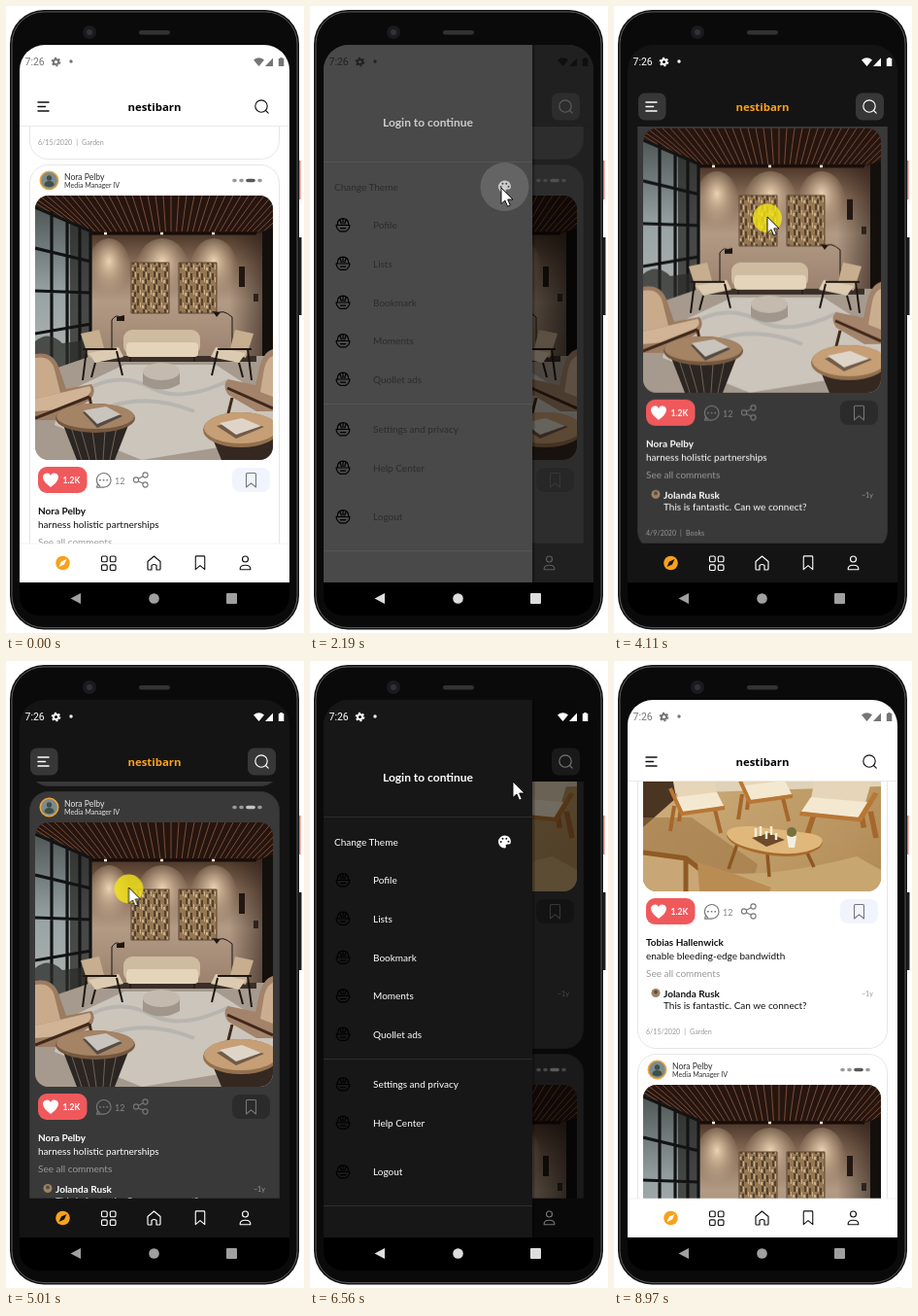
These frames come from a looping animation (307x645 px, 9000 ms). An HTML page:

```html
<!DOCTYPE html>
<html lang="en">
<head>
<meta charset="utf-8">
<title>App theme demo</title>
<style>
@property --bg { syntax: '<color>'; inherits: true; initial-value: #fff; }
@property --panel { syntax: '<color>'; inherits: true; initial-value: #fff; }
@property --card { syntax: '<color>'; inherits: true; initial-value: #fff; }
@property --line { syntax: '<color>'; inherits: true; initial-value: #e6e6e6; }
@property --rule { syntax: '<color>'; inherits: true; initial-value: #e9e9e9; }
@property --fg { syntax: '<color>'; inherits: true; initial-value: #111; }
@property --btn { syntax: '<color>'; inherits: true; initial-value: #fff; }
@property --save { syntax: '<color>'; inherits: true; initial-value: #f1f4fc; }
@property --brand { syntax: '<color>'; inherits: true; initial-value: #000; }
@property --item { syntax: '<color>'; inherits: true; initial-value: #1c1c1c; }
@property --sys { syntax: '<color>'; inherits: true; initial-value: rgba(0,0,0,.54); }
@property --nav { syntax: '<color>'; inherits: true; initial-value: #999; }

html, body { margin: 0; width: 100%; height: 100%; overflow: hidden; background: #fff; }
svg { display: block; width: 100vw; height: 100vh; }
text { font-family: Lato, sans-serif; font-size: 10px; fill: var(--fg); }
.b { font-weight: 700; }
.s { font-size: 7.1px; }
.mute { fill: #999; }
.ico { fill: none; stroke: var(--fg); stroke-width: 1.15; stroke-linecap: round; stroke-linejoin: round; }
.soft { fill: none; stroke: #777; stroke-width: 1.1; stroke-linejoin: round; }

#app { animation: theme 9s linear infinite, items 9s linear infinite, sys 9s step-end infinite, nav 9s step-end infinite; }
#feed { animation: scroll 9s linear infinite; }
#drawer { animation: drawer 9s ease-out infinite; }
#scrim { animation: scrim 9s ease-out infinite; }
#ripple { transform-box: fill-box; transform-origin: center; animation: ripple 9s ease-out infinite; }
#cursor { animation: move 9s ease-in-out infinite; }
#press { animation: press 9s step-end infinite; }

@keyframes theme {
  0%, 22.6%, 83.13%, 100% { --bg: #fff; --panel: #fff; --card: #fff; --line: #e6e6e6; --rule: #e9e9e9; --fg: #111; --btn: #fff; --save: #f1f4fc; --brand: #000; }
  24.82%, 80.91% { --bg: #141414; --panel: #171717; --card: #393939; --line: #303030; --rule: #141414; --fg: #fff; --btn: #373737; --save: #2b2b2b; --brand: #f9a11b; }
}
@keyframes items {
  0%, 24.2%, 84.3%, 100% { --item: #1c1c1c; }
  26.2%, 82.1% { --item: #fff; }
}
@keyframes sys {
  0%, 83.5%, 100% { --sys: rgba(0,0,0,.54); }
  24.9% { --sys: #fff; }
}
@keyframes nav {
  0%, 40%, 90.44%, 100% { --nav: #a0a0a0; }
  11.56%, 68.89% { --nav: #ddd; }
}
@keyframes scroll {
  0%, 43.78% { transform: none; }
  45.67% { transform: translateY(-69px); animation-timing-function: ease-out; }
  47.78% { transform: translateY(-104px); animation-timing-function: ease-out; }
  52.22% { transform: translateY(-112px); }
  53.78% { transform: translateY(-112px); animation-timing-function: ease-in; }
  56.89% { transform: translateY(76px); animation-timing-function: cubic-bezier(.2,.55,.5,.95); }
  60% { transform: translateY(230px); animation-timing-function: ease-out; }
  63.78%, 100% { transform: translateY(241px); }
}
@keyframes drawer {
  0%, 11.56%, 40%, 68.89%, 90.44%, 100% { transform: translateX(-232px); }
  14.33%, 37.33%, 71.56%, 87.67% { transform: none; }
}
@keyframes scrim {
  0%, 11.56%, 40%, 68.89%, 90.44%, 100% { opacity: 0; }
  14.33%, 37.33%, 71.56%, 87.67% { opacity: .54; }
}
@keyframes ripple {
  0%, 22.5% { opacity: 0; transform: scale(.3); }
  24.2%, 27% { opacity: .15; transform: none; }
  30.4% { opacity: 0; transform: none; }
  80.8% { opacity: 0; transform: scale(.3); }
  82.5% { opacity: .05; transform: none; }
  84.7%, 100% { opacity: 0; transform: none; }
}
@keyframes move {
  0%, 1.1% { transform: translate(268px, 665px); }
  1.11% { transform: translate(268px, 613px); }
  10.4%, 14% { transform: translate(34px, 102px); }
  20.5%, 33.5% { transform: translate(197px, 187px); }
  36.5%, 38% { transform: translate(262px, 300px); }
  43%, 43.78% { transform: translate(158px, 286px); animation-timing-function: linear; }
  45.67% { transform: translate(158px, 217px); animation-timing-function: ease-out; }
  47.78%, 48.5% { transform: translate(158px, 182px); }
  52.5%, 53.78% { transform: translate(130px, 150px); animation-timing-function: ease-in; }
  56.89%, 64.6% { transform: translate(122px, 338px); }
  68%, 69.5% { transform: translate(34px, 102px); }
  72.89% { transform: translate(209px, 124px); }
  75% { transform: translate(209px, 127px); }
  79.5%, 84.9% { transform: translate(209px, 190px); }
  86.7%, 88.5% { transform: translate(262px, 320px); }
  94.9% { transform: translate(272px, 625px); }
  95.22% { transform: translate(272px, 638px); }
  95.5%, 100% { transform: translate(293px, 658px); }
}
@keyframes press {
  0%, 12.2%, 23.6%, 38%, 47.78%, 56.89%, 69.6%, 81.8%, 88.6% { opacity: 0; }
  10.9%, 22%, 37%, 43.78%, 53.78%, 68.4%, 80.3%, 87.4%, 99.6%, 100% { opacity: .8; }
}
</style>
</head>
<body>
<svg viewBox="0 0 307 645" preserveAspectRatio="none">
<defs>
  <clipPath id="screen"><path d="M14 593V66a26 26 0 0 1 26-26H266a26 26 0 0 1 26 26V593Z"/></clipPath>
  <clipPath id="list"><rect x="14" y="124" width="278" height="429"/></clipPath>
  <clipPath id="pic"><rect width="245" height="272" rx="14"/></clipPath>
  <linearGradient id="wall" x2="0" y2="1"><stop offset=".14" stop-color="#4b3527"/><stop offset=".26" stop-color="#8a6f5a"/><stop offset=".4" stop-color="#b29a84"/><stop offset=".6" stop-color="#9c8471"/></linearGradient>
  <radialGradient id="glow" cy=".35"><stop stop-color="#ecd3b2"/><stop offset="1" stop-color="#c3a78b" stop-opacity="0"/></radialGradient>
  <linearGradient id="shade"><stop stop-color="#2a1d16" stop-opacity="0"/><stop offset="1" stop-color="#2a1d16" stop-opacity=".75"/></linearGradient>
  <linearGradient id="pane" x2="0" y2="1"><stop stop-color="#4d5554"/><stop offset=".5" stop-color="#98a3a4"/><stop offset="1" stop-color="#b4b8b4"/></linearGradient>
  <linearGradient id="floor" x2="1" y2="1"><stop stop-color="#dcbf8d"/><stop offset="1" stop-color="#b08a55"/></linearGradient>
  <pattern id="mosaic" width="11" height="13" patternUnits="userSpaceOnUse">
    <rect width="11" height="13" fill="#957753"/><path d="M1 0h2v6h-2zM6 2h2v7h-2zM3 8h2v5h-2z" fill="#54412f"/><path d="M4 1h1v5h-1zM9 6h1v5h-1zM0 9h2v3h-2z" fill="#cbb287"/>
  </pattern>

  <g id="seat">
    <path d="M4 36 0 62M46 40 52 64M12 30 9 52" stroke="#a5672c" stroke-width="4" fill="none"/>
    <path d="M2 0 44-4 48 24 8 28Z" fill="#e6d5b8"/>
    <path d="M6 27 48 22 55 36 11 43Z" fill="#f4e8d0"/>
    <path d="M0 18 12 44 56 38" stroke="#b87734" stroke-width="4" fill="none"/>
  </g>

  <g id="lobby" clip-path="url(#pic)">
    <rect width="245" height="272" fill="url(#wall)"/>
    <ellipse cx="76" cy="78" rx="23" ry="34" fill="url(#glow)"/>
    <ellipse cx="131" cy="78" rx="28" ry="34" fill="url(#glow)"/>
    <ellipse cx="184" cy="78" rx="25" ry="34" fill="url(#glow)"/>
    <rect x="200" y="38" width="45" height="128" fill="url(#shade)"/>
    <path d="M0 0H245V34L228 39H58L0 18Z" fill="#26150f"/>
    <g id="slats" stroke="#7a4d39"></g>
    <path d="M58 39H228" stroke="#160d0a" stroke-width="3"/>
    <path d="M71 39h3M129 39h3M182 39h3" stroke="#fff3d8" stroke-width="2.5"/>
    <path d="M0 10 58 36V172L0 192Z" fill="url(#pane)"/>
    <path d="M36 27 58 36V172L36 178Z" fill="#23211e" opacity=".7"/>
    <path d="M0 12 58 37M0 54 58 68M0 98 58 100M0 142 58 132M17 16V185M33 26V180M46 30V175M57 36V170" stroke="#131313" stroke-width="3.2" fill="none"/>
    <path d="M0 150Q14 138 28 152L58 148V172L0 192Z" fill="#2a2b28" opacity=".75"/>
    <path d="M234 37 245 33V165H234Z" fill="#130f0c"/>
    <path d="M210 73h6v21h-6z" fill="#211811"/>
    <path d="M225 101h5v8h-5z" fill="#2b241e"/>
    <path d="M99 69h39v52H99zM148 69h39v52h-39z" fill="url(#mosaic)" stroke="#5f4835"/>
    <path d="M0 185 58 165H245V272H0Z" fill="#a59a8d"/>
    <path d="M62 165H228V171H62Z" fill="#3a2f28"/>
    <path d="M28 204 92 174H186L245 212V250L110 272 20 236Z" fill="#cbc5bc"/>
    <path d="M60 196q30-14 60 2t80-8M80 216q40-12 84 6" stroke="#a3a5a3" stroke-width="4" fill="none" opacity=".5"/>
    <path d="M79 165V128q5-7 9-2M203 165V125q-10-9-16-3" stroke="#1d1611" fill="none"/>
    <path d="m84 125 8-2v6h-8zM183 119l8 1-4 5z" fill="#1d1611"/>
    <rect x="91" y="138" width="79" height="26" rx="9" fill="#cfbb9f"/>
    <rect x="94" y="151" width="74" height="15" rx="4" fill="#e3d4ba"/>
    <path d="M98 166v5M164 166v5" stroke="#2b1f17" stroke-width="2"/>
    <g id="arm">
      <path d="M47 142 66 138 72 161 55 167Z" fill="#c6ae8f"/><path d="M55 162 86 156 91 166 62 172Z" fill="#dccbb0"/>
      <path d="M49 158H84M53 158 49 190M84 160 90 185M62 172 58 187" stroke="#1f1712" stroke-width="2" fill="none"/>
    </g>
    <use href="#arm" transform="matrix(-1 0 0 1 272 0)"/>
    <path d="M111 182v12q19 11 38 0v-12z" fill="#a0968b"/><ellipse cx="130" cy="181" rx="19" ry="9" fill="#c4baad"/>
    <path d="M0 163Q18 160 24 176L32 199 58 194Q64 200 57 210L24 231H0Z" fill="#9c7b60"/>
    <path d="M0 167Q16 164 20 179L26 203 0 209Z" fill="#c9ab8c"/>
    <path d="M26 203 56 196Q60 200 54 206L24 220 0 222V209Z" fill="#d0b495"/>
    <path d="M0 229 56 207M30 226 43 245M56 207 59 222" stroke="#3f281b" stroke-width="3" fill="none"/>
    <path d="M245 158Q235 161 231 177L227 195 199 189Q192 195 199 205L228 222H245Z" fill="#a3836a"/>
    <path d="M245 165Q237 168 235 184L232 202 245 207Z" fill="#cbae90"/>
    <path d="M198 198 245 219M203 208 198 228" stroke="#3f281b" stroke-width="3" fill="none"/>
    <path d="M27 231 43 272H82L98 231Z" fill="#2c2622"/><path d="M36 235 48 272M47 240 56 272M59 242 63 272M72 242 70 272M84 238 77 272" stroke="#6d6259" fill="none"/>
    <ellipse cx="62" cy="229" rx="41" ry="15" fill="#75583f"/><ellipse cx="62" cy="227" rx="40" ry="13" fill="#a58365"/>
    <path d="m49 223 24-5 17 9-26 12z" fill="#544b44"/><path d="m50 221 23-4 15 8-24 10z" fill="#c9c4bd"/>
    <path d="M182 248 192 272H245V248Z" fill="#352820"/>
    <ellipse cx="212" cy="241" rx="39" ry="18" fill="#94704e"/><ellipse cx="212" cy="239" rx="38" ry="16" fill="#c69f76"/>
    <path d="m187 237 26-7 23 8-29 12z" fill="#715b49"/><path d="m190 234 23-5 20 8-26 9z" fill="#ded5c8"/>
  </g>

  <g id="lounge" clip-path="url(#pic)">
    <rect width="245" height="272" fill="url(#floor)"/>
    <path d="M0 0H245V164L0 172Z" fill="#e0d2b8"/>
    <path d="M0 120H24L34 176 0 206Z" fill="#4a3422"/>
    <path d="M0 196 50 196 118 244 110 272H0Z" fill="#9b7442" opacity=".55"/>
    <path d="M60 250Q120 262 220 236L245 250V272H60Z" fill="#c8a670"/>
    <use href="#seat" x="28" y="148"/>
    <use href="#seat" x="98" y="136"/>
    <use href="#seat" transform="matrix(-1.4 0 0 1.05 240 152)"/>
    <path d="M97 223 88 249M166 226 176 247M128 234 130 257" stroke="#8d5722" stroke-width="3.5"/>
    <path d="M86 215Q86 206 112 207L170 214Q192 218 181 228 160 241 120 233 90 226 86 215Z" fill="#a76b2c"/>
    <path d="M86 213Q86 204 112 205L170 212Q192 216 181 226 160 238 120 230 90 224 86 213Z" fill="#e0b87c"/>
    <path d="m112 217 18-5 16 7-19 7z" fill="#6d4a2b"/>
    <path d="M116 216v-9M121 215v-10M127 218v-8M132 214v-9M137 219v-7" stroke="#f5eddb" stroke-width="2.4"/>
    <path d="M148 215h10l-2 12h-6z" fill="#f3eee2"/><circle cx="153" cy="211" r="5" fill="#77703f"/>
    <path d="M0 234 44 240 76 264 74 272H0Z" fill="#c9a675"/><path d="M0 232 44 238 78 264M44 240V272" stroke="#8f5a25" stroke-width="5" fill="none"/>
    <path d="M56 242 94 254 132 268 130 272H58Z" fill="#b98c54"/>
  </g>

  <path id="mark" d="M-5-6.5q0-1 1-1h8q1 0 1 1V7L0 2.8-5 7Z"/>
  <g id="bowl" fill="none" stroke="#000" stroke-width="1.2" stroke-linejoin="round">
    <path d="M-7 0H7Q6.5 4.5 3 6.3H-3Q-6.5 4.5-7 0ZM-5.8-.5Q-5.5-6.8 0-6.8T5.8-.5M-3-5.5-1.6-1M0-6.6V-1M3-5.5 1.6-1M-3 3.2H3"/>
  </g>
  <g id="actions">
    <rect x="33" y="311" width="50.5" height="27" rx="9" fill="#f0595c"/>
    <path d="M46 332q-8-5.600-8-10.400a4.200 4.200 0 0 1 8-1.600 4.200 4.200 0 0 1 8 1.600q0 4.800-8 10.400z" fill="#fff"/>
    <text x="58.5" y="328" class="b" style="font-size:8.5px;fill:#fff">1.2K</text>
    <path class="soft" d="M97 331.100a7.300 7.300 0 1 1 3.600 1H93.500l1-3.200"/>
    <path d="M96 324.700h1.700M99.700 324.700h1.700M103.400 324.700h1.700" stroke="#777" stroke-width="1.6"/>
    <text x="112" y="328.500" style="font-size:9px;fill:#858585">12</text>
    <g class="soft"><circle cx="134" cy="324.500" r="2.600"/><circle cx="143.500" cy="319.500" r="2.600"/><circle cx="143.500" cy="329.500" r="2.600"/><path d="m136.300 323.300 4.900-2.600m-4.900 5 4.900 2.600"/></g>
    <rect x="233" y="312" width="39" height="25" rx="8" fill="var(--save)"/>
    <use href="#mark" x="252.5" y="325" class="soft"/>
  </g>
</defs>

<!-- phone body -->
<path d="M301 159h2.500v40H301z" fill="#f2705c"/><path d="M301 238h3.500v80H301z" fill="#1b1b1b"/>
<rect x="4" y="4" width="298" height="637.500" rx="35" fill="#141414"/>
<rect x="6" y="6" width="294" height="633.500" rx="33" fill="#0a0a0a" stroke="#565656"/>
<circle cx="86" cy="27" r="7" fill="#1b1b1d"/><circle cx="86" cy="27" r="3" fill="#30323a"/>
<rect x="137" y="25" width="32" height="4.500" rx="2.200" fill="#323232"/>
<rect x="14" y="560" width="278" height="67" rx="20"/>

<g id="app">
  <g clip-path="url(#screen)">
    <rect x="14" y="40" width="278" height="553" fill="var(--bg)"/>
    <rect x="25" y="89.500" width="28.500" height="28" rx="7" fill="var(--btn)"/>
    <rect x="249" y="89.500" width="29" height="28" rx="7" fill="var(--btn)"/>
    <path class="ico" style="stroke-width:1.5" d="M33 99H44M33 103.500H40.500M33 108H44"/>
    <g class="ico"><circle cx="263" cy="103" r="6.200"/><path d="m267.500 107.500 2.700 2.700"/></g>
    <text x="153" y="108" text-anchor="middle" style="font:700 11.4px 'Open Sans',sans-serif;fill:var(--brand)">nestibarn</text>
    <path d="M14 123.500H292" stroke="var(--rule)"/>
    <g clip-path="url(#list)"><g id="feed"></g></g>
    <rect x="14" y="553" width="278" height="40" fill="var(--bg)"/>
    <path d="M14 553H292" stroke="var(--rule)" stroke-opacity=".6"/>
    <circle cx="58.500" cy="573" r="7.300" fill="#f9a11b"/>
    <path d="m62.500 569-2.500 5.500-5.500 2.500 2.500-5.500z" fill="var(--bg)"/>
    <g class="ico">
      <rect id="tile" x="98.500" y="566" width="5.700" height="5.700" rx="1.300"/>
      <use href="#tile" x="8.800"/><use href="#tile" y="8.800"/><use href="#tile" x="8.800" y="8.800"/>
      <path d="M146 571.500 152.500 566l6.500 5.500v7.500q0 1-1 1h-3v-4.500q-2.500-2-5 0v4.500h-3q-1 0-1-1z"/>
      <use href="#mark" transform="translate(200 573) scale(.95)"/>
      <circle cx="246.500" cy="569" r="3"/><path d="M241.200 579.700q-.6-4.500 5.300-4.500t5.300 4.500z"/>
    </g>

    <rect id="scrim" x="14" y="40" width="278" height="553"/>
    <g id="drawer">
      <path d="M229 40h2.500v553H229z" opacity=".25"/>
      <rect x="14" y="40" width="215" height="553" fill="var(--panel)"/>
      <path d="M14 160.500H229M14 409.500H229M14 560.500H229" stroke="#888" stroke-opacity=".2"/>
      <text x="121.500" y="123.500" text-anchor="middle" class="b" style="font-size:12px">Login to continue</text>
      <text x="25" y="189.500" style="fill:var(--item)">Change Theme</text>
      <circle id="ripple" cx="200.500" cy="186" r="25" fill="#fff"/>
      <path d="M200.500 179.500a6.500 6.500 0 1 0 0 13q2.200-.3 1-2.400 0-1.600 1.800-1.600h1.700q2-.2 2-3-.7-6-6.500-6z" fill="var(--fg)"/>
      <g fill="var(--panel)"><circle cx="196.700" cy="186" r="1"/><circle cx="198.500" cy="182.800" r="1"/><circle cx="202.300" cy="182.800" r="1"/><circle cx="204.500" cy="185.800" r="1"/></g>
      <g id="menu"></g>
    </g>

    <!-- status bar -->
    <g fill="var(--sys)">
      <text x="19.500" y="61" style="font:10.5px Roboto,sans-serif;fill:var(--sys)">7:26</text>
      <circle cx="51.500" cy="57.500" r="2.600" fill="none" stroke="var(--sys)" stroke-width="2"/>
      <circle cx="51.500" cy="57.500" r="4.200" fill="none" stroke="var(--sys)" stroke-width="1.300" stroke-dasharray="2.200"/>
      <circle cx="67" cy="57" r="1.700"/>
      <path d="M255 55.500q5.500-4.500 11 0l-5.500 6.500zM267 62l8-8.500V62zM280.800 54h1.500v-1h2.500v1h1.500v8h-5.500z"/>
    </g>
  </g>
  <g fill="var(--nav)"><path d="M77 604v11l-10.500-5.500z"/><circle cx="152.500" cy="609.500" r="5.300"/><rect x="227" y="604" width="11" height="11" rx="1"/></g>
</g>

<g id="cursor">
  <circle id="press" cy="1.500" r="15" fill="#f5e616"/>
  <path d="M0 0V16.500L3.900 13 6.600 19.200 9.300 18 6.700 12H12Z" fill="#fff" stroke="#000" stroke-width=".9"/>
</g>
</svg>
<script>
const $ = id => document.getElementById(id);

const post = (top, photo, who, line, date, tag) => `
<g transform="translate(0 ${top})">
  <rect x="24.5" y=".5" width="257" height="465" rx="19" fill="var(--card)" stroke="var(--line)"/>
  <circle cx="44.5" cy="16.5" r="9.2" fill="#7d8a8c" stroke="#eda53c" stroke-width="1.6"/>
  <circle cx="44.5" cy="14" r="2.7" fill="#3f4f49"/><path d="M39.5 21.5q0-4.5 5-4.5t5 4.500q-5 3.500-10 0z" fill="#3f4f49"/>
  <text x="60" y="15.5" style="font-size:8.6px" fill-opacity=".88">${who}</text>
  <text x="60" y="24" class="s" fill-opacity=".88">Media Manager IV</text>
  <path d="M235 16.500h1M242 16.500h1M261 16.500h1" stroke="#999" stroke-width="3.600" stroke-linecap="round"/>
  <path d="M249 16.500h6" stroke="var(--fg)" stroke-opacity=".7" stroke-width="3.600" stroke-linecap="round"/>
  <use href="#${photo}" x="30" y="32"/>
  <use href="#actions"/>
  <text x="33" y="359.5" class="b">${who}</text>
  <text x="33" y="374">${line}</text>
  <text x="33" y="392" class="mute">See all comments</text>
  <circle cx="43" cy="408.5" r="4.5" fill="#9a8468"/><circle cx="43" cy="407.5" r="1.9" fill="#5d4c3a"/>
  <text x="51" y="412.5" class="b">Jolanda Rusk</text>
  <text x="51" y="424.5">This is fantastic. Can we connect?</text>
  <text x="255" y="411.5" class="s mute">~1y</text>
  <text x="33" y="451" class="s mute">${date}<tspan dx="4">|</tspan><tspan dx="4">${tag}</tspan></text>
</g>`;

const lounge = ['lounge', 'Tobias Hallenwick', 'enable bleeding-edge bandwidth', '6/15/2020', 'Garden'];
const lobby = ['lobby', 'Nora Pelby', 'harness holistic partnerships', '4/9/2020', 'Books'];
$('feed').innerHTML = [lounge, lobby, lounge].map((p, i) => post(-308 + 471 * i, ...p)).join('');

const menu = [['Pofile', 225.5], ['Lists', 265], ['Bookmark', 305], ['Moments', 344.5], ['Quollet ads', 384],
  ['Settings and privacy', 435.5], ['Help Center', 475], ['Logout', 525.5]];
$('menu').innerHTML = menu.map(([name, y]) =>
  `<use href="#bowl" x="34" y="${y}"/><text x="65" y="${y + 3.5}" style="fill:var(--item)">${name}</text>`).join('');

// ceiling slats lean towards a point below the ceiling
$('slats').innerHTML = Array.from({ length: 44 }, (_, i) => {
  const x = -60 + i * 8;
  const end = x + (140 - x) * 0.3;
  return `<path d="M${x} 0L${end} ${end < 58 ? 18 + end * 0.3 : 37}"/>`;
}).join('');
</script>
</body>
</html>
```
